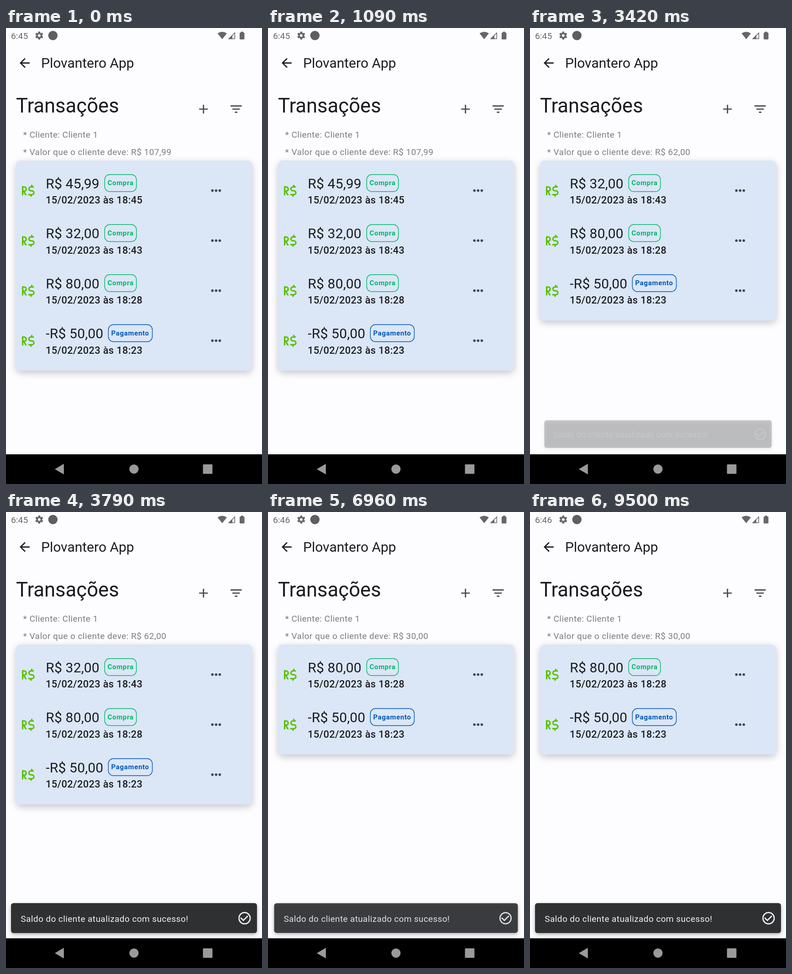
An HTML page with a canvas for the animation above (9540 ms loop, 561 by 998 pixels).

```html
<!DOCTYPE html>
<html lang="pt">
<head>
<meta charset="utf-8">
<title>Transações</title>
<style>
  html, body { margin: 0; width: 100%; height: 100%; overflow: hidden; background: #fdfcff; }
  canvas { display: block; width: 561px; height: 998px; }
</style>
</head>
<body>
<canvas id="stage" width="561" height="998"></canvas>
<script>
const ctx = document.getElementById('stage').getContext('2d');

const LOOP = 9540;
const DP = 561 / 411.43;
const ROW = 109.5;
const INK = '#1a1c1e', ICON = '#43474e', STATUS = '#666666', NAV = '#9a9a9a';
const GREEN = '#00b766', BLUE = '#0057b5';

// Times of the two deletions, as the moment each menu opens.
const OPENINGS = [2150, 5570];
const CLOSE = 800, UPDATE = 1240;
const CLOCK_TICK = 4700;

const ENTRIES = [
  ['R$ 45,99', '18:45'],
  ['R$ 32,00', '18:43'],
  ['R$ 80,00', '18:28'],
  ['-R$ 50,00', '18:23']
];
const DEBTS = ['107,99', '62,00', '30,00'];

const icons = {
  back: 'M20 11H7.83l5.59-5.59L12 4l-8 8 8 8 1.41-1.41L7.83 13H20z',
  plus: 'M19 13h-6v6h-2v-6H5v-2h6V5h2v6h6z',
  filter: 'M10 18h4v-2h-4zM3 6v2h18V6zM6 13h12v-2H6z',
  trash: 'M6 19c0 1.1.9 2 2 2h8c1.1 0 2-.9 2-2V7H6zM19 4h-3.5l-1-1h-5l-1 1H5v2h14z',
  check: 'M16.59 7.58L10 14.17l-3.59-3.58L5 12l5 5 8-8zM12 2a10 10 0 1 0 0 20a10 10 0 1 0 0-20zM12 20a8 8 0 1 1 0-16a8 8 0 1 1 0 16z',
  real: 'M21 14.25A3.75 3.75 0 0 1 17.25 18H17v2h-2v-2h-3v-2h5.25a1.75 1.75 0 0 0 0-3.5h-1.5a3.75 3.75 0 0 1 0-7.5H16V3h2v2h2v2h-4.25a1.75 1.75 0 0 0 0 3.5h1.5A3.75 3.75 0 0 1 21 14.25z' +
    'M10 9a4 4 0 0 1-2.9 3.85L10 18H7.7L5 13.1V18H3V5h3a4 4 0 0 1 4 4zM8 9a2 2 0 0 0-2-2H5v4h1a2 2 0 0 0 2-2z'
};
for (const name in icons) icons[name] = new Path2D(icons[name]);

const clamp = v => Math.max(0, Math.min(1, v));
const progress = (t, start, length) => clamp((t - start) / length);
const easeOut = p => 1 - Math.pow(1 - p, 1.7);

// cubic-bezier(.4, 0, .2, 1)
function standard(p) {
  let lo = 0, hi = 1;
  for (let i = 0; i < 24; i++) {
    const s = (lo + hi) / 2, r = 1 - s;
    if (1.2 * r * r * s + 0.6 * r * s * s + s * s * s < p) lo = s; else hi = s;
  }
  return lo * lo * (3 - 2 * lo);
}

function text(str, x, y, size, color, spacing = 0, weight = 400) {
  ctx.font = `${weight} ${size}px Roboto, sans-serif`;
  ctx.letterSpacing = spacing + 'px';
  ctx.fillStyle = color;
  ctx.fillText(str, x, y);
}

function box(x, y, w, h, r) {
  ctx.beginPath();
  ctx.roundRect(x, y, w, h, r);
}

function fill(color) {
  ctx.fillStyle = color;
  ctx.fill();
}

function disc(x, y, r, color) {
  ctx.beginPath();
  ctx.arc(x, y, r, 0, Math.PI * 2);
  fill(color);
}

function poly(points, color) {
  ctx.beginPath();
  points.forEach(([x, y]) => ctx.lineTo(x, y));
  ctx.closePath();
  fill(color);
}

function icon(name, cx, cy, color, scale = DP) {
  ctx.save();
  ctx.translate(cx - 12 * scale, cy - 12 * scale);
  ctx.scale(scale, scale);
  ctx.fillStyle = color;
  ctx.fill(icons[name], 'evenodd');
  ctx.restore();
}

function raised(color, blur, drop, alpha) {
  ctx.save();
  ctx.shadowColor = `rgba(0,0,0,${alpha})`;
  ctx.shadowBlur = blur;
  ctx.shadowOffsetY = drop;
  fill(color);
  ctx.restore();
}

function gear(cx, cy) {
  ctx.save();
  ctx.translate(cx, cy);
  ctx.fillStyle = STATUS;
  for (let i = 0; i < 6; i++) {
    ctx.fillRect(-2.2, -8.7, 4.4, 5);
    ctx.rotate(Math.PI / 3);
  }
  disc(0, 0, 6.6, STATUS);
  disc(0, 0, 2.9, '#fdfcff');
  ctx.restore();
}

function statusBar(t) {
  text(t < CLOCK_TICK ? '6:45' : '6:46', 11, 24, 19.1, STATUS, 0.1);
  gear(72.8, 16.5);
  disc(102.8, 16.5, 10.2, '#5e5e5e');

  ctx.beginPath();
  ctx.moveTo(473.8, 24.5);
  ctx.lineTo(463.6, 11.8);
  ctx.quadraticCurveTo(473.8, 4.6, 484, 11.8);
  ctx.closePath();
  fill(STATUS);

  ctx.beginPath();
  ctx.moveTo(488.5, 23.6);
  ctx.lineTo(501.3, 23.6);
  ctx.lineTo(501.3, 10.8);
  ctx.closePath();
  ctx.strokeStyle = STATUS;
  ctx.lineWidth = 1.5;
  ctx.stroke();
  poly([[487, 24.3], [496, 24.3], [496, 15.5]], STATUS);

  box(512, 10, 10.5, 15, 1.5);
  fill(STATUS);
  ctx.fillRect(514.8, 8, 5, 3);
}

function header(debt) {
  icon('back', 40.9, 76.6, INK);
  text('Plovantero App', 77, 87, 30, INK);
  text('Transações', 22, 185, 43.6, INK);
  icon('plus', 432.8, 177.5, ICON);
  icon('filter', 504.3, 177.5, ICON);
  text('* Cliente: Cliente 1', 37.6, 240, 19.1, '#7d7d80', 0.44);
  text('* Valor que o cliente deve: R$ ' + debt, 37.6, 278.3, 19.1, '#7d7d80', 0.44);
}

function chip(label, x, y, w, color) {
  box(x, y, w, 37.3, 11);
  ctx.strokeStyle = color;
  ctx.lineWidth = 1.4;
  ctx.stroke();
  text(label, x + 6.2, y + 23.4, 15, color, 0.68, 700);
}

function entry([amount, hour], top) {
  const payment = amount[0] === '-';
  icon('real', 48.8, top + 67, '#55bf00', 1.535);
  text(amount, 87.2, top + 60.5, 30, INK, 0.2);
  text(`15/02/2023 às ${hour}`, 87, top + 94, 21.8, INK, 0.35, 500);
  if (payment) chip('Pagamento', 224.3, top + 59.3 - 28.5 - 0.1, 96.3, BLUE);
  else chip('Compra', 216.3, top + 30.7, 69.5, GREEN);
  for (let i = -1; i <= 1; i++) disc(460.4 + i * 8.1, top + 65.8, 2.8, ICON);
}

function card(removed) {
  const rows = ENTRIES.slice(removed);
  box(22, 290, 517.5, 22 + ROW * rows.length, 10);
  raised('#dbe6f6', 16, 5, 0.22);
  rows.forEach((row, i) => entry(row, 290 + i * ROW));
}

function ripple(t, start) {
  const grow = easeOut(progress(t, start, 190));
  const fade = 1 - progress(t, start + 240, 200);
  if (!grow || !fade) return;
  disc(460.4, 355.8, 27 * grow, `rgba(66,71,100,${0.12 * fade})`);
}

function menu(t, start) {
  const scale = standard(progress(t, start, 250));
  const alpha = scale * (1 - standard(progress(t, start + CLOSE, 250)));
  if (alpha < 0.005) return;
  ctx.save();
  ctx.globalAlpha = alpha;
  ctx.translate(496, 320);
  ctx.scale(scale, scale);
  ctx.translate(-496, -320);
  box(277, 320, 219, 87.5, 5.5);
  raised('#ebe9fb', 8, 3, 0.28);
  icon('trash', 310.4, 364.4, ICON);
  text('Excluir', 342.2, 373, 21.8, INK, 0.3);
  ctx.restore();
}

function snackbar(t) {
  const [first, second] = OPENINGS.map(s => s + UPDATE);
  if (t < first) return;
  const again = t >= second;
  const shown = easeOut(progress(t, again ? second : first, 200));
  const hidden = again ? 0 : progress(t, second - 110, 100);
  const scale = 0.9 + 0.1 * shown;
  ctx.save();
  ctx.globalAlpha = shown * (1 - hidden);
  ctx.translate(280.5, 889);
  ctx.scale(scale, scale);
  ctx.translate(-280.5, -889);
  box(11, 856, 539, 65.5, 5.5);
  raised('#2f3032', 9, 3, 0.3);
  text('Saldo do cliente atualizado com sucesso!', 32.2, 896.8, 19.1, '#f1f0f4', 0.39);
  icon('check', 522.8, 889, '#f1f0f4');
  ctx.restore();
}

function navBar() {
  ctx.fillStyle = '#000';
  ctx.fillRect(0, 933, 561, 65);
  poly([[107, 965.4], [126.8, 953.8], [126.8, 977]], NAV);
  disc(280.4, 965.4, 10.1, NAV);
  box(431.6, 955, 20.8, 20.8, 1.5);
  fill(NAV);
}

function draw(t) {
  const removed = OPENINGS.filter(s => t >= s + UPDATE).length;
  ctx.fillStyle = '#fdfcff';
  ctx.fillRect(0, 0, 561, 998);
  statusBar(t);
  header(DEBTS[removed]);
  card(removed);
  OPENINGS.forEach(s => {
    ripple(t, s - 140);
    menu(t, s);
  });
  snackbar(t);
  navBar();
}

const began = performance.now();
function frame() {
  draw((performance.now() - began) % LOOP);
  requestAnimationFrame(frame);
}
frame();
</script>
</body>
</html>
```
